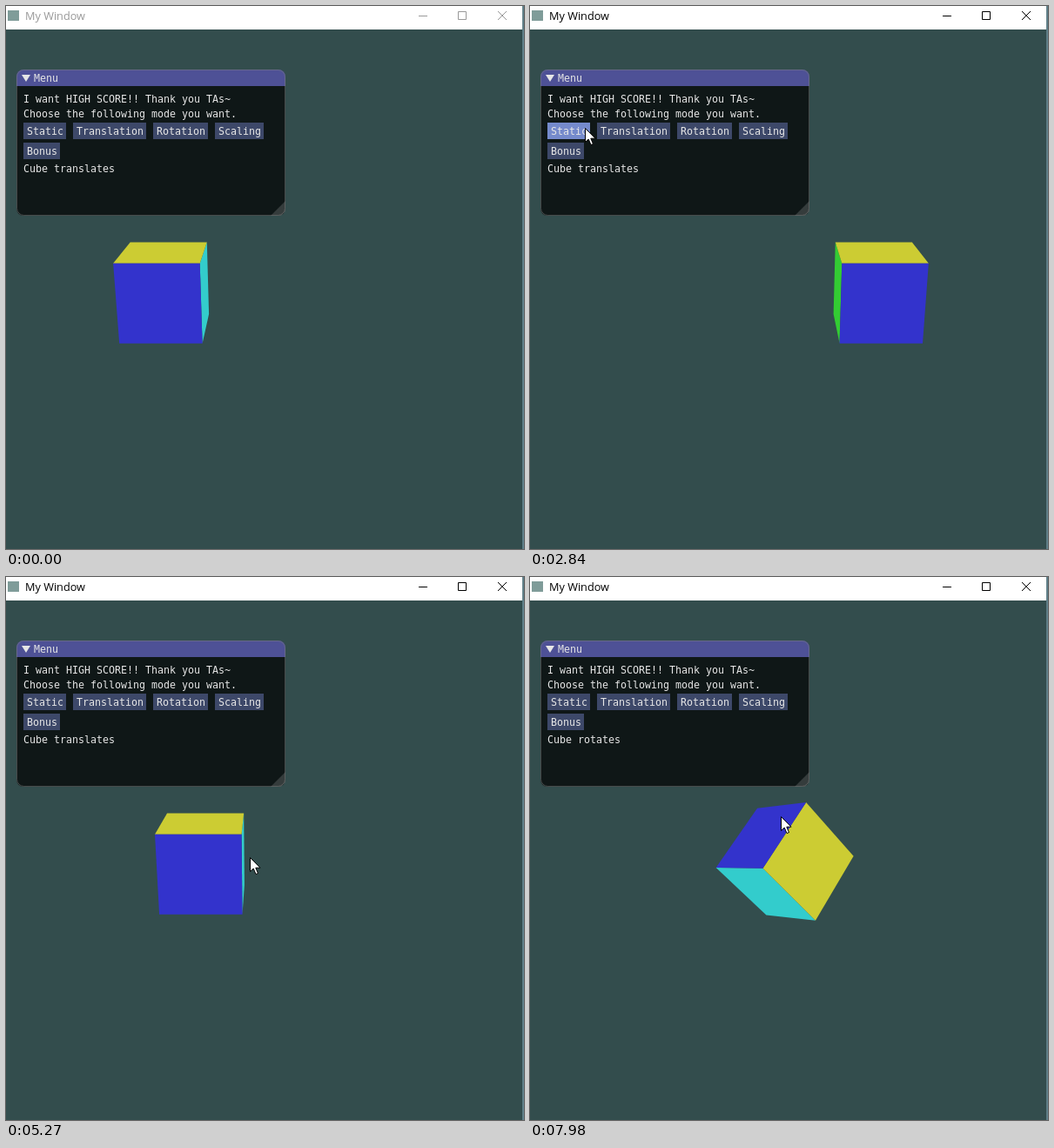
An HTML page with a canvas that plays this animation: 595x624 px, repeating every 8000 ms.

```html
<!DOCTYPE html>
<html lang="en">
<head>
<meta charset="utf-8">
<style>
  html, body { margin: 0; width: 100%; height: 100%; overflow: hidden; background: #334d4d; }
  canvas { display: block; }
</style>
</head>
<body>
<canvas id="stage" width="595" height="624"></canvas>
<script>
const ctx = document.getElementById('stage').getContext('2d');
const LOOP = 8000, ENTER = 60, FOCUS = 2700;
// Times when a mode button is released; each press lasts PRESS ms
const STATIC = 2900, TRANSLATE = 4250, ROTATE = 7100, PRESS = 100;
const MENU_FONT = '11.63px "DejaVu Sans Mono", monospace';
const TITLE_FONT = '12.7px "Open Sans", sans-serif';
const INK = '#e6e6e6';

// Buttons flow from left to right and wrap at the menu's edge
const BUTTON_HEIGHT = 19;
const buttons = [];
let flowX = 20, flowY = 134;
for (const label of ['Static', 'Translation', 'Rotation', 'Scaling', 'Bonus']) {
  const width = (label.length + 1) * 7;
  if (flowX + width > 313) {
    flowX = 20;
    flowY += BUTTON_HEIGHT + 4;
  }
  buttons.push({ label, width, x: flowX, y: flowY });
  flowX += width + 8;
}

// Eased pointer moves; it rests between them
const MOVES = [
  { from: ENTER, to: 750, x: 98, y: 300 },
  { from: 850, to: 1250, x: 272, y: 395 },
  { from: 1300, to: 1670, x: 115, y: 299 },
  { from: 2050, to: 2500, x: 63, y: 140 },
  { from: 3130, to: 3800, x: 95, y: 142 },
  { from: 4450, to: 4900, x: 359, y: 320 },
  { from: 4900, to: 5270, x: 280, y: 322 },
  { from: 5400, to: 7000, x: 203, y: 147 },
  { from: 7440, to: 7980, x: 288, y: 275 }
];

function pointerAt(t) {
  let x = 384, y = 594;
  for (const move of MOVES) {
    const k = Math.min(1, Math.max(0, (t - move.from) / (move.to - move.from)));
    const eased = k * k * (3 - 2 * k);
    x += (move.x - x) * eased;
    y += (move.y - y) * eased;
  }
  return { x, y };
}

function modeAt(t) {
  if (t >= ROTATE) return 'rotates';
  return t >= STATIC && t < TRANSLATE ? 'is static' : 'translates';
}

function rect(x, y, w, h, color) {
  ctx.fillStyle = color;
  ctx.fillRect(x, y, w, h);
}

function roundRect(x, y, w, h, radii, color) {
  ctx.beginPath();
  ctx.roundRect(x, y, w, h, radii);
  ctx.fillStyle = color;
  ctx.fill();
}

function text(str, x, y, color = INK, font = MENU_FONT) {
  ctx.font = font;
  ctx.fillStyle = color;
  ctx.fillText(str, x, y);
}

function polygon(points, color) {
  ctx.beginPath();
  points.forEach(([x, y]) => ctx.lineTo(x, y));
  ctx.closePath();
  ctx.fillStyle = color;
  ctx.fill();
}

// 45 degree camera at (0, 5, 15) looking at the origin
function project([x, y, z]) {
  const root = Math.sqrt(10), focal = 300 / Math.tan(Math.PI / 8);
  const scale = focal / (Math.sqrt(250) - (y + 3 * z) / root);
  return [293 + x * scale, 327.3 - (3 * y - z) / root * scale];
}

// Turn about the axis (0, 1, 1)
function rotate([x, y, z], angle) {
  const c = Math.cos(angle), s = Math.sin(angle), h = Math.SQRT1_2;
  const along = (y + z) * h, across = (y - z) * h;
  const turned = across * c + x * s;
  return [x * c - across * s, (along + turned) * h, (along - turned) * h];
}

// Negative and positive side of each axis
const FACE_COLORS = [['#33cc33', '#33cccc'], ['#cc33cc', '#cccc33'], ['#cc3333', '#3333cc']];

function drawCube(t, mode) {
  const seconds = t / 1000;
  const shift = mode === 'translates' ? 2.5 * Math.sin(1.062 * (seconds - 1.73)) : 0;
  const angle = mode === 'rotates' ? 4.19 + 1.45 * (seconds - 7.98) : 0;
  FACE_COLORS.forEach((pair, axis) => pair.forEach((color, side) => {
    const sign = side * 2 - 1;
    const corners = [[-1, -1], [1, -1], [1, 1], [-1, 1]].map(([b, c]) => {
      const p = [];
      p[axis] = sign;
      p[(axis + 1) % 3] = b * sign;
      p[(axis + 2) % 3] = c;
      const [x, y, z] = rotate(p, angle);
      return project([x + shift, y, z]);
    });
    const [[x0, y0], [x1, y1], [x2, y2]] = corners;
    const facing = (x1 - x0) * (y2 - y0) - (y1 - y0) * (x2 - x0) < 0;
    if (facing) polygon(corners, color);
  }));
}

function drawTitleBar(active) {
  const ink = active ? '#000' : '#999';
  rect(0, 0, 593, 27, '#fff');
  rect(2, 5, 13, 12, '#7f9c99');
  text('My Window', 22, 16, ink, TITLE_FONT);
  ctx.strokeStyle = ink;
  ctx.lineWidth = 1;
  ctx.beginPath();
  ctx.moveTo(474, 11.5); ctx.lineTo(484, 11.5);
  ctx.rect(519.5, 6.5, 9, 9);
  ctx.moveTo(565, 6); ctx.lineTo(575, 16);
  ctx.moveTo(575, 6); ctx.lineTo(565, 16);
  ctx.stroke();
}

function drawMenu(t, mode, pointer) {
  roundRect(12, 92, 309, 149, [0, 0, 8, 8], 'rgba(0,0,0,.7)');
  roundRect(12, 73, 309, 19, [8, 8, 0, 0], 'rgba(82,82,161,.87)');
  polygon([[304, 241], [321, 224], [321, 236], [316, 241]], 'rgba(255,255,255,.16)');
  ctx.beginPath();
  ctx.roundRect(12.5, 73.5, 308, 167, 8);
  ctx.strokeStyle = 'rgba(128,128,128,.5)';
  ctx.lineWidth = 1;
  ctx.stroke();

  polygon([[18, 79], [28, 79], [23, 87]], INK);
  text('Menu', 32, 87);
  text('I want HIGH SCORE!! Thank you TAs~', 20, 111);
  text('Choose the following mode you want.', 20, 128);
  const pressed = [STATIC, TRANSLATE, ROTATE].some(end => t >= end - PRESS && t < end);
  for (const { label, x, y, width } of buttons) {
    const hovered = t >= FOCUS && pointer.x >= x && pointer.x < x + width &&
      pointer.y >= y && pointer.y < y + BUTTON_HEIGHT;
    const fill = !hovered ? 'rgba(89,102,156,.62)'
      : pressed ? '#758acc' : 'rgba(102,122,181,.79)';
    rect(x, y, width, BUTTON_HEIGHT, fill);
    text(label, x + 4, y + 14);
  }
  text('Cube ' + mode, 20, 191);
}

function drawPointer({ x, y }) {
  ctx.save();
  ctx.translate(Math.round(x) + .5, Math.round(y) + .5);
  polygon([[0, 0], [0, 16], [3.7, 12.5], [6.5, 19], [9, 18], [6.3, 11.7], [11.5, 11.7]], '#fff');
  ctx.strokeStyle = '#000';
  ctx.lineWidth = 1;
  ctx.stroke();
  ctx.restore();
}

function draw(now) {
  const t = now % LOOP;
  const mode = modeAt(t), pointer = pointerAt(t);
  rect(0, 0, 595, 624, '#334d4d');
  drawCube(t, mode);
  drawTitleBar(t >= FOCUS);
  rect(593, 0, 2, 624, '#5f7f88');
  drawMenu(t, mode, pointer);
  if (t >= ENTER) drawPointer(pointer);
}

const start = performance.now();
function tick() {
  draw(performance.now() - start);
  requestAnimationFrame(tick);
}
tick();
</script>
</body>
</html>
```
